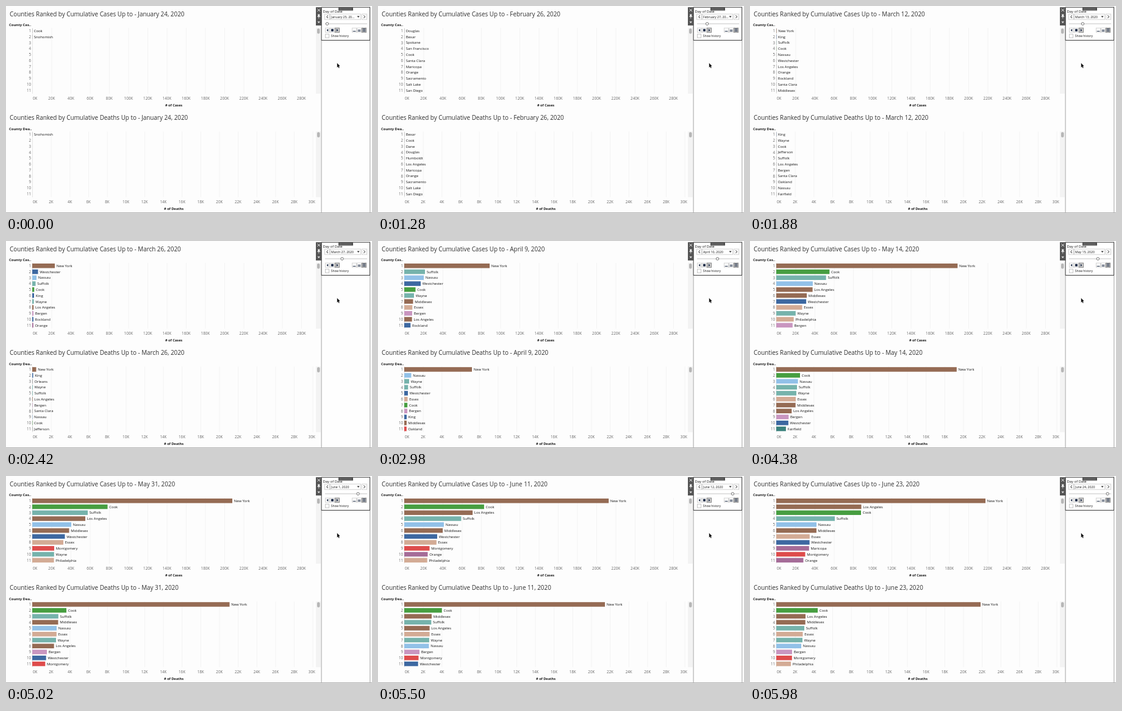
Write an HTML page with a canvas that moves like this. It is 600x340 px and loops after 6000 ms.

```html
<!DOCTYPE html>
<html lang="en">
<head>
<meta charset="utf-8">
<title>Counties ranked</title>
<style>
html, body { margin: 0; width: 100%; height: 100%; overflow: hidden; background: #fdfdfd; }
canvas { display: block; width: 600px; height: 340px; }
</style>
</head>
<body>
<canvas id="stage"></canvas>
<script>
const W = 600, H = 340, LOOP = 6000, X0 = 43.3;
const canvas = document.getElementById('stage');
const ctx = canvas.getContext('2d');
const dpr = window.devicePixelRatio || 1;
canvas.width = W * dpr;
canvas.height = H * dpr;

const FONT = '"Open Sans", "Noto Sans", sans-serif';
const INK = '#161616', MUTED = '#686868', ICON = '#22304a';
const MONTHS = ['January', 'February', 'March', 'April', 'May', 'June'];

const brown = '#956b54', teal = '#76b3ac', blue = '#3d68a1', tan = '#d3ab95', purple = '#a56c98', red = '#de4c4c';
const COLORS = {
  'New York': brown, 'Los Angeles': brown, Middlesex: brown,
  Suffolk: teal, Wayne: teal, Westchester: blue, King: blue, Rockland: blue,
  Essex: tan, Philadelphia: tan, Orange: purple, Maricopa: purple,
  Nassau: '#92c1e8', Cook: '#479e41', Bergen: '#c996c0', Hudson: '#7ec874',
  Montgomery: red, Oakland: red, Fairfield: '#3c827d'
};

// Bar lengths in pixels on these days; a short row keeps its last value.
const DAYS = [62, 76, 97, 128, 151];
const CASES = {
  'New York': [37, 140, 272, 328, 343],
  Suffolk: [5.5, 34, 74, 91, 96],
  Nassau: [7, 32, 56.5, 64, 66],
  Westchester: [9.5, 27, 45.5, 53.5, 54.6],
  Cook: [3.3, 18.5, 57.5, 123.5, 139],
  'Los Angeles': [2.2, 12.7, 37, 87, 139.5],
  Middlesex: [1.7, 14.5, 41.5, 60.5, 65.9],
  Essex: [1.6, 13.3, 35.5, 51, 54.8],
  Wayne: [2.6, 16, 28.5, 35.8, 36.5],
  Bergen: [2, 13, 25, 29, 30],
  Rockland: [1.9, 10.3, 18],
  Orange: [1.8, 8.5, 18, 33, 44.5],
  King: [3, 6, 9.5],
  Hudson: [1.2, 8, 24, 29],
  Montgomery: [0.8, 6, 17, 36, 47.5],
  Philadelphia: [0.8, 8, 23, 35.6, 40],
  Maricopa: [0.6, 2.5, 6.5, 14, 53.8],
  'Santa Clara': [0.9, 2],
  Snohomish: [1, 2]
};
const DEATHS = {
  'New York': [6.5, 111, 273, 323.5, 335],
  Nassau: [0.4, 11.5, 32, 40, 41],
  Wayne: [0.75, 8, 28, 39, 43],
  Suffolk: [0.7, 6.3, 26.8, 42.8, 46],
  Cook: [0.38, 5.2, 25, 56, 68],
  Essex: [0.2, 5.5, 25.5, 39.8, 43.5],
  Middlesex: [0.2, 3.9, 22.7, 42.5, 47.7],
  Westchester: [0.2, 6, 17.6, 22.7],
  Bergen: [0.5, 5.1, 17.3, 24, 26],
  'Los Angeles': [0.6, 3.5, 16.8, 35.7, 48],
  King: [1.5, 4, 8],
  Orleans: [0.8, 3, 6],
  'Santa Clara': [0.45, 0.8],
  Jefferson: [0.35, 2, 5],
  Oakland: [0.33, 3.8, 11],
  Fairfield: [0.3, 2.5, 12.5, 20],
  Montgomery: [0.1, 1, 10, 21.3, 25.8],
  Philadelphia: [0.1, 2.5, 9, 20, 24]
};
// First day and weight of the earliest reports.
const EARLY = {
  Snohomish: [-1, 1], Cook: [0, 2], Orange: [1, 1], 'Los Angeles': [2, 0.9], Maricopa: [2, 1],
  'Santa Clara': [7, 2], Suffolk: [8, 1], 'San Francisco': [9, 3], Dane: [12, 0.9],
  'San Diego': [17, 1], Bexar: [19, 11], Douglas: [24, 13], Humboldt: [27, 0.9],
  Sacramento: [28, 1], Spokane: [31, 4], 'Salt Lake': [32, 1]
};
const NAMES = [...new Set([...Object.keys(CASES), ...Object.keys(DEATHS), ...Object.keys(EARLY)])];

const lerp = (a, b, u) => a + (b - a) * u;
const powLerp = (a, b, u, n) => Math.pow(lerp(Math.pow(a, 1 / n), Math.pow(b, 1 / n), u), n);

function grow(row, start, from, day) {
  if (day < DAYS[0]) return powLerp(from, row[0], (day - start) / (DAYS[0] - start), 7);
  const at = i => row[Math.min(i, row.length - 1)];
  let i = 0;
  while (i < DAYS.length - 2 && day >= DAYS[i + 1]) i++;
  const u = (day - DAYS[i]) / (DAYS[i + 1] - DAYS[i]);
  return powLerp(at(i), at(i + 1), u, i ? 1 : 3);
}

function caseStart(name, i) {
  if (EARLY[name] || name === 'King') return 36;
  return name === 'New York' ? 39 : 37 + i % 5;
}

function caseValue(name, i, day) {
  const early = EARLY[name], row = CASES[name], start = caseStart(name, i);
  const from = early ? early[1] * 0.0016 : name === 'King' ? 0.018 : 0.0016;
  if (early && (day <= start || !row)) return day >= early[0] ? from : -1;
  return row && day >= start ? grow(row, start, from, day) : -1;
}

function deathValue(name, i, day) {
  const row = DEATHS[name];
  const start = name === 'King' ? 36 : name === 'New York' ? 50 : 44 + i % 4;
  if (row && day >= start) return grow(row, start, name === 'King' ? 0.016 : 0, day);
  const first = EARLY[name] ? EARLY[name][0] : caseStart(name, i);
  return day > first ? 0 : -1;
}

function ranked(valueOf, day) {
  return NAMES.map((name, i) => ({ name, v: valueOf(name, i, day) }))
    .filter(r => r.v >= 0)
    .sort((a, b) => b.v - a.v || (a.name < b.name ? -1 : 1))
    .slice(0, 11);
}

const CLOCK = [[0, 0], [1280, 33], [2420, 62], [2980, 76], [3800, 97], [5020, 128], [5980, 151]];
function dayAt(t) {
  let i = 0;
  while (i < CLOCK.length - 2 && t >= CLOCK[i + 1][0]) i++;
  const [t0, d0] = CLOCK[i], [t1, d1] = CLOCK[i + 1];
  return Math.min(151, Math.floor(lerp(d0, d1, (t - t0) / (t1 - t0)) + 0.1));
}

function dateText(day) {
  const d = new Date(Date.UTC(2020, 0, 24 + day));
  return `${MONTHS[d.getUTCMonth()]} ${d.getUTCDate()}, 2020`;
}

function text(s, x, y, size, color, align = 'left', weight = 400) {
  ctx.font = `${weight} ${size}px ${FONT}`;
  ctx.textAlign = align;
  ctx.textBaseline = 'alphabetic';
  ctx.fillStyle = color;
  ctx.fillText(s, x, y + size * 0.36);
}

function rect(x, y, w, h, color) {
  ctx.fillStyle = color;
  ctx.fillRect(x, y, w, h);
}

function box(x, y, w, h, stroke, fill = '#fff') {
  rect(x, y, w, h, fill);
  ctx.strokeStyle = stroke;
  ctx.lineWidth = 1;
  ctx.strokeRect(x + 0.5, y + 0.5, w - 1, h - 1);
}

function path(points, color, filled, width = 1) {
  ctx.beginPath();
  points.forEach(([x, y]) => ctx.lineTo(x, y));
  if (filled) {
    ctx.fillStyle = color;
    ctx.fill();
  } else {
    ctx.strokeStyle = color;
    ctx.lineWidth = width;
    ctx.stroke();
  }
}

function chart(o, day) {
  const { top, kind } = o;
  text(`Counties Ranked by Cumulative ${kind} Up to - ${dateText(day)}`, 6, top + 13.7, 9.87, '#303030');
  text(`County ${kind.slice(0, 3)}..`, 5, top + 31.2, 5.9, INK, 'left', 700);

  for (let i = 0; i <= o.ticks; i++) {
    const x = X0 + i * o.gap;
    rect(x - 0.3, top + 36, 1, 108, i ? '#f3f3f3' : '#e6e6e6');
    const label = i * o.unit + 'K';
    if (i) text(label, Math.min(x, 501.3), top + 151.9, 6.2, MUTED, 'center');
    else text(label, 44, top + 151.9, 6.2, MUTED);
  }
  text(`# of ${kind}`, 275, top + 163.2, 5.6, INK, 'center', 700);

  const rowY = i => top + 40.8 + i * 9.76;
  ranked(o.valueOf, day).forEach((r, i) => {
    const y = rowY(i);
    rect(X0 - 0.3, y - 3.8, 0.8, 7.5, '#c0c0c0');
    if (r.v > 0.15) rect(X0 - 0.3, y - 3.8, r.v, 7.5, COLORS[r.name] || '#999');
    text(r.name, X0 + r.v + 2.4, y, 5.95, INK);
  });
  for (let i = 0; i < 11; i++) text(i + 1, 41, rowY(i), 6.2, MUTED, 'right');

  rect(508, top + 36, 8, 108, '#f3f3f3');
  ctx.fillStyle = '#b6b6b6';
  ctx.beginPath();
  ctx.roundRect(510, top + 37, 4.5, 8.5, 2);
  ctx.fill();
}

function toolbar() {
  rect(508, 2, 9.5, 30, '#555');
  path([[510.5, 4.5], [515, 9]], '#fff', false, 0.9);
  path([[515, 4.5], [510.5, 9]], '#fff', false, 0.9);
  rect(511.3, 13.5, 3, 3.5, '#eee');
  rect(510.3, 17, 5, 0.9, '#eee');
  rect(512.4, 18, 0.8, 2.5, '#eee');
  path([[510.5, 25.5], [515, 25.5], [512.75, 28.2]], '#eee', true);

  rect(545, 2, 24, 5.5, '#505050');
  for (let x = 547; x < 567; x += 2) {
    rect(x, 3.8, 1, 0.7, '#999');
    rect(x, 5.5, 1, 0.7, '#999');
  }
}

function panel(day) {
  rect(517, 0, 83, 340, '#fefefe');
  rect(516.6, 57, 1, 283, '#a4a4a4');
  rect(596.3, 57, 1, 283, '#a4a4a4');
  rect(0, 339, 600, 1, '#b0b0b0');
  box(516.6, 1.6, 80.5, 55.2, '#333');
  toolbar();

  ctx.save();
  ctx.translate(0, -0.3);
  text('Day of Date', 519.5, 9, 5.9, INK);

  box(522, 13, 9, 10, '#d2d2d2');
  box(531, 13, 51, 10, '#d2d2d2');
  box(583, 13, 9, 10, '#d2d2d2');
  path([[528, 15.7], [525.7, 18], [528, 20.3]], '#222');
  path([[586.3, 15.7], [588.6, 18], [586.3, 20.3]], '#222');
  path([[575.5, 16.8], [579.7, 16.8], [577.6, 19.4]], '#333', true);
  const date = dateText(day + 1);
  text(date.length > 15 ? date.slice(0, -2) + '...' : date, 533, 18, 5.2, INK);

  rect(523, 29, 69, 1, '#c4c4c4');
  ctx.beginPath();
  ctx.arc(526.5 + day * 0.395, 29.5, 2.2, 0, Math.PI * 2);
  ctx.fillStyle = '#fff';
  ctx.fill();
  ctx.strokeStyle = '#666';
  ctx.lineWidth = 0.9;
  ctx.stroke();

  box(523, 36, 8, 8, '#d4d4d4');
  box(531, 36, 8, 8, '#d4d4d4');
  box(539, 36, 8, 8, '#888', '#d0d0d0');
  path([[528.3, 37.8], [525.5, 40], [528.3, 42.2]], ICON, true);
  rect(533, 38, 4, 4, ICON);
  path([[541.8, 37.8], [544.6, 40], [541.8, 42.2]], ICON, true);

  for (let i = 0; i < 3; i++) {
    const x = 567 + i * 8;
    box(x, 36, 8, 8, i === 2 ? '#888' : '#d4d4d4', i === 2 ? '#d0d0d0' : '#fff');
    for (let j = 0; j <= i; j++) rect(x + 1.7, 41.2 - j * 1.9, 4.7, 1, ICON);
  }

  box(523, 46, 7, 7, '#c4c4c4');
  text('Show history', 532.7, 49.3, 4.9, INK);
  ctx.restore();

  path([[542.8, 93.8], [542.8, 101], [544.4, 99.6], [545.5, 102], [546.7, 101.4],
    [545.6, 99.1], [547.6, 98.8]], '#111', true);
}

const CHARTS = [
  { top: 0, kind: 'Cases', ticks: 14, gap: 31.5, unit: 20, valueOf: caseValue },
  { top: 170.2, kind: 'Deaths', ticks: 15, gap: 30.65, unit: 2, valueOf: deathValue }
];

function draw() {
  const day = dayAt(performance.now() % LOOP);
  ctx.setTransform(dpr, 0, 0, dpr, 0, 0);
  rect(0, 0, W, H, '#fdfdfd');
  CHARTS.forEach(c => chart(c, day));
  panel(day);
  requestAnimationFrame(draw);
}
draw();
</script>
</body>
</html>
```
